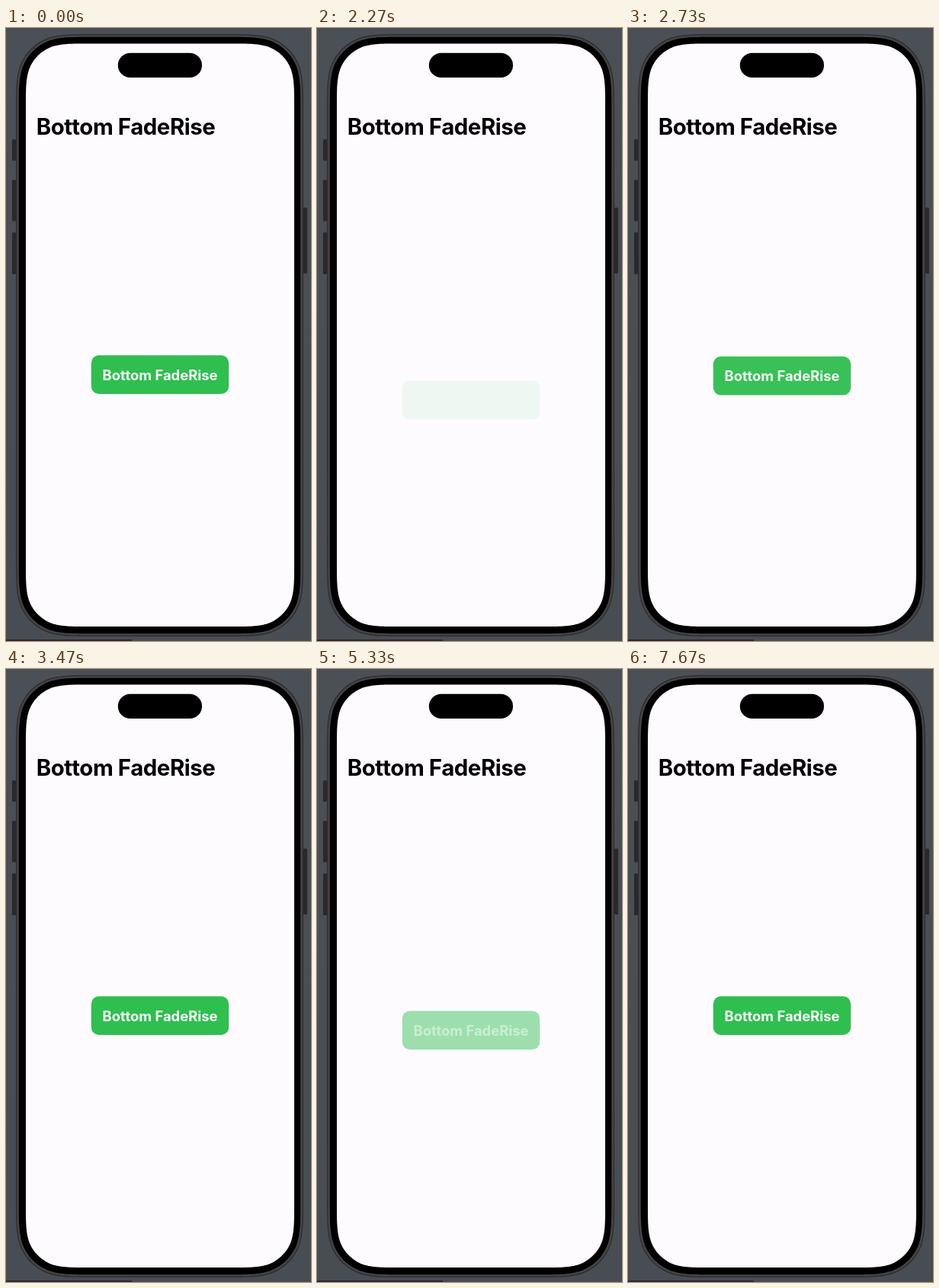
An HTML page for the animation above (7.74 s loop, 400 px wide and 804 px high).

```html
<!DOCTYPE html>
<html lang="en">
<head>
<meta charset="utf-8">
<title>Bottom FadeRise</title>
<style>
  html, body { margin: 0; width: 100%; height: 100%; overflow: hidden; background: #4a5056; }
  svg { display: block; width: 400px; height: 804px; }
  text { font-family: Inter, "Liberation Sans", sans-serif; font-weight: 700; }
  #title { font-size: 29.4px; letter-spacing: -0.44px; }
  #label { font-size: 18.4px; text-anchor: middle; fill: #fff; }
</style>
</head>
<body>
<svg viewBox="0 0 400 804">
  <defs>
    <linearGradient id="wall" x2="0" y2="1">
      <stop stop-color="#4b5056"/>
      <stop offset="1" stop-color="#484d54"/>
    </linearGradient>
  </defs>
  <rect width="400" height="804" fill="url(#wall)"/>
  <rect y="802" width="165" height="2" fill="#30272c"/>
  <g fill="#2b282b">
    <rect x="8" y="146" width="5" height="28" rx="1.5"/>
    <rect x="8" y="199" width="5" height="54.5" rx="1.5"/>
    <rect x="8" y="268" width="5" height="55" rx="1.5"/>
    <rect x="390" y="235.5" width="5" height="86.5" rx="1.5"/>
  </g>
  <g id="phone"></g>
  <rect x="146.8" y="32.7" width="110.3" height="32.4" rx="16.2"/>
  <text id="title" x="39.7" y="139.8">Bottom FadeRise</text>
  <g id="button">
    <rect id="plate" x="111.8" y="429.2" width="180.4" height="50.8" rx="10"/>
    <text id="label" x="202" y="461.8">Bottom FadeRise</text>
  </g>
</svg>
<script>
const $ = id => document.getElementById(id);
const LOOP = 7740, FRAME = 1000 / 15, RISE = 36, DURATION = 700;
const CYCLES = [{ hide: 1800, show: 2138 }, { hide: 4666, show: 4997 }];

// Continuous corner on the unit radius, from one side to the other
const CORNER = [[0, 1.529], [0, 1.088], [0, 0.868], [0.075, 0.631],
  [0.169, 0.373], [0.373, 0.169], [0.631, 0.075], [0.868, 0], [1.088, 0], [1.529, 0]];

function squircle(x, y, w, h, r, fill) {
  const corner = (flipX, flipY) => {
    const pts = CORNER.map(([u, v]) =>
      [flipX ? x + w - u * r : x + u * r, flipY ? y + h - v * r : y + v * r].join(' '));
    if (flipX !== flipY) pts.reverse();
    return `${pts[0]}C${pts.slice(1).join(' ')}`;
  };
  const d = [corner(false, false), corner(true, false), corner(true, true), corner(false, true)];
  return `<path fill="${fill}" d="M${d.join('L')}Z"/>`;
}

$('phone').innerHTML =
  squircle(13, 8, 377, 790, 67, '#2e2b2e') +
  squircle(14.2, 9.2, 374.6, 787.6, 66, '#464346') +
  squircle(16.8, 11.8, 369.4, 782.4, 63.5, '#000') +
  squircle(26, 20.5, 352, 764.5, 54.3, '#fdfbfe');
$('plate').setAttribute('fill', '#2ebf4f');

// cubic-bezier(.42, 0, .58, 1)
function easeInOut(x) {
  if (x <= 0 || x >= 1) return x <= 0 ? 0 : 1;
  let lo = 0, hi = 1, s;
  for (let i = 0; i < 24; i++) {
    s = (lo + hi) / 2;
    const bx = 1.26 * s * (1 - s) ** 2 + 1.74 * s * s * (1 - s) + s ** 3;
    if (bx < x) lo = s; else hi = s;
  }
  return s * s * (3 - 2 * s);
}

function progress(t) {
  let p = 1;
  for (const c of CYCLES) if (t >= c.hide) p = easeInOut((t - c.show) / DURATION);
  return p;
}

const start = performance.now();
function draw(now) {
  const t = Math.max(0, now - start) % LOOP;
  const p = progress(Math.floor((t + 4) / FRAME) * FRAME);
  $('button').setAttribute('transform', `translate(0 ${RISE * (1 - p)})`);
  // Plate and label fade separately, so the plate shows through the label
  $('plate').setAttribute('opacity', p);
  $('label').setAttribute('opacity', p);
  requestAnimationFrame(draw);
}
draw(start);
</script>
</body>
</html>
```
